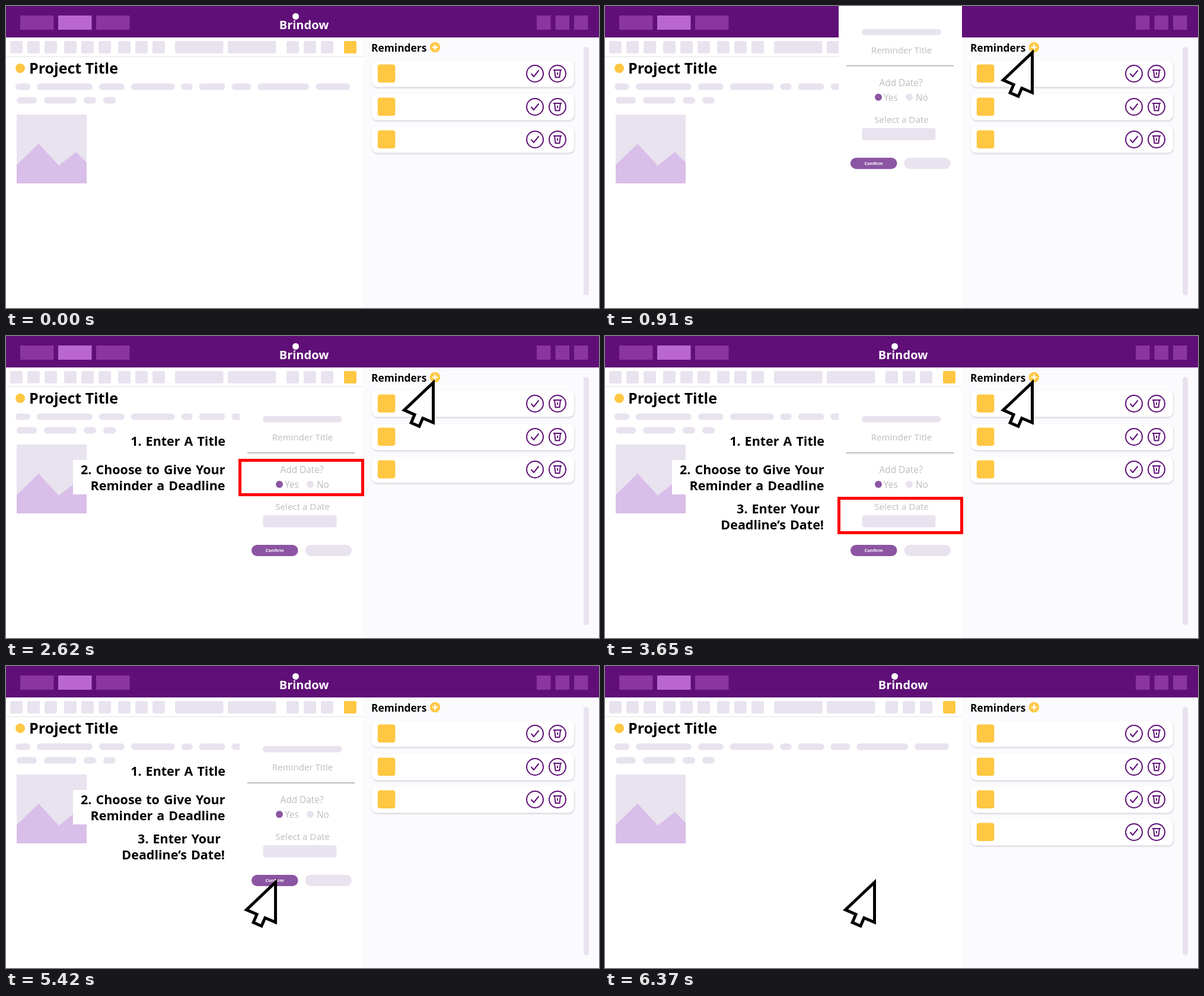
Animation of 1000 by 509 pixels, one loop 7500 ms. Source, as an HTML page with a canvas:

```html
<!DOCTYPE html>
<html lang="en">
<head>
<meta charset="utf-8">
<title>Adding a reminder</title>
<style>
html, body { margin: 0; width: 100%; height: 100%; overflow: hidden; background: #fff; }
canvas { display: block; width: 1000px; height: 509px; }
</style>
</head>
<body>
<canvas id="stage" width="1000" height="509"></canvas>
<script>
const ctx = document.getElementById('stage').getContext('2d');
const LOOP = 7500, TICK = 30;
const FONT = '"Open Sans", "Noto Sans", sans-serif';
const PURPLE = '#5f0f77', MID = '#8a35a2', BUTTON = '#8c55a3';
const PALE = '#e9e2ef', YELLOW = '#ffc742', GREY = '#bdbdbd';

const STEPS = [
  { at: 1490, top: 146, height: 67, baseline: 185, right: 370, lines: ['1. Enter A Title'] },
  { at: 2620, top: 207, height: 63, baseline: 233, right: 369.5,
    lines: ['2. Choose to Give Your', 'Reminder a Deadline'] },
  { at: 3650, top: 271, height: 63, baseline: 299, right: 369,
    lines: ['3. Enter Your ', 'Deadline’s Date!'] }
];
const STEPS_END = 4820;

// Linear progress in whole ticks, from 0 to 1
function progress(t, start, ticks) {
  const n = Math.floor((t - start) / TICK + 1e-6);
  return Math.max(0, Math.min(ticks, n)) / ticks;
}

function repeat(count, draw) {
  for (let i = 0; i < count; i++) draw(i);
}

function at(x, y, draw) {
  ctx.save();
  ctx.translate(x, y);
  draw();
  ctx.restore();
}

function faded(alpha, draw) {
  ctx.globalAlpha = alpha;
  draw();
  ctx.globalAlpha = 1;
}

function rect(x, y, w, h, color) {
  ctx.fillStyle = color;
  ctx.fillRect(x, y, w, h);
}

function round(x, y, w, h, r, color) {
  ctx.fillStyle = color;
  ctx.beginPath();
  ctx.roundRect(x, y, w, h, r);
  ctx.fill();
}

function circle(x, y, r) {
  ctx.beginPath();
  ctx.arc(x, y, r, 0, Math.PI * 2);
}

function disc(x, y, r, color) {
  circle(x, y, r);
  ctx.fillStyle = color;
  ctx.fill();
}

function path(points) {
  ctx.beginPath();
  points.forEach(([x, y]) => ctx.lineTo(x, y));
}

function stroke(color, width) {
  ctx.strokeStyle = color;
  ctx.lineWidth = width;
  ctx.stroke();
}

function text(str, x, y, size, weight, color, align = 'left') {
  ctx.font = `${weight} ${size}px ${FONT}`;
  ctx.fillStyle = color;
  ctx.textAlign = align;
  ctx.fillText(str, x, y);
}

function header() {
  rect(0, 0, 1000, 53, PURPLE);
  repeat(3, i => {
    rect(24 + 64 * i, 16, 56.5, 24, i === 1 ? '#b966d3' : MID);
    rect(895 + 31.5 * i, 16, 23.5, 24, MID);
  });
  disc(488.5, 17.5, 5.5, '#fff');
  text('Brindow', 502.5, 39, 20, 700, '#fff', 'center');
}

function toolbar() {
  const buttons = left => repeat(3, i => round(left + 29 * i, 59, 21, 21, 3, PALE));
  repeat(3, i => buttons(7 + 91 * i));
  buttons(473);
  repeat(2, i => round(285 + 89 * i, 59, 81.5, 21, 3, PALE));
  round(570, 59, 21, 21, 2, YELLOW);
  rect(0, 85, 602, 1, '#e4e2e6');
}

// A line of placeholder words with even gaps
function words(x, y, gap, widths) {
  for (const w of widths) {
    round(x, y, w, 11, 5.5, PALE);
    x += w + gap;
  }
}

function project() {
  disc(24, 105, 8, YELLOW);
  text('Project Title', 39, 114, 25, 700, '#000');
  words(16, 130.5, 10.9, [25, 94, 43, 74, 19, 44, 33, 87, 58]);
  words(18, 153.5, 12, [34, 55, 21, 21]);
  at(18, 183, () => {
    rect(0, 0, 118, 116, PALE);
    path([[0, 85], [37, 49], [71, 86], [100, 63], [118, 81], [118, 116], [0, 116]]);
    ctx.fillStyle = '#d9bee9';
    ctx.fill();
  });
}

function tick() {
  path([[-6.5, 0], [-2, 5], [6.5, -5.5]]);
  stroke(PURPLE, 2);
}

function bin() {
  path([[-7, -6], [7, -6]]);
  stroke(PURPLE, 2);
  path([[-5, -6], [-3.4, 6.3], [3.4, 6.3], [5, -6]]);
  stroke(PURPLE, 2);
  rect(-1, -2, 2, 4, PURPLE);
}

function card(i) {
  at(617, 92 + Math.ceil(55.3 * i), () => {
    ctx.shadowColor = 'rgba(40, 20, 60, 0.2)';
    ctx.shadowBlur = 3;
    ctx.shadowOffsetX = 0.5;
    ctx.shadowOffsetY = 1.5;
    round(0, 0, 341, 44.5, 9, '#fff');
    ctx.shadowColor = 'transparent';
    round(9.8, 6.6, 29.6, 30.3, 4, YELLOW);
    [tick, bin].forEach((icon, k) => at(275 + 38 * k, 22, () => {
      circle(0, 0, 14);
      stroke(PURPLE, 2);
      icon();
    }));
  });
}

function sidebar(newCard) {
  rect(602, 53, 398, 456, '#fbfafd');
  text('Reminders', 616, 77, 17.4, 700, '#000');
  disc(723.5, 69.5, 8.7, YELLOW);
  rect(718.5, 68.4, 10, 2.2, '#fff');
  rect(722.4, 64.5, 2.2, 10, '#fff');
  repeat(3, card);
  faded(newCard, () => card(3));
  round(974, 69, 9, 418.5, 4.5, PALE);
}

function panel() {
  rect(394, 90, 208, 298, '#fff');
  round(433, 135, 133.5, 10.5, 5, PALE);
  text('Reminder Title', 500, 176, 15.1, 400, GREY, 'center');
  rect(407, 196, 181, 2, GREY);
  text('Add Date?', 499, 231, 15.4, 400, GREY, 'center');
  ['Yes', 'No'].forEach((label, i) => {
    disc(461 + 52 * i, 250, 6, i ? PALE : BUTTON);
    text(label, 470 + 54 * i, 256, 15.4, 400, GREY);
  });
  text('Select a Date', 500, 293, 15.2, 400, GREY, 'center');
  round(433.5, 302, 124, 20.5, 4, PALE);
  repeat(2, i => round(414 + 90.5 * i, 352, 78.5, 19, 9.5, i ? PALE : BUTTON));
  text('Confirm', 453, 364, 7.7, 700, '#fff', 'center');
}

function captions(shown) {
  ctx.wordSpacing = '1.4px';
  shown.forEach((step, i) => {
    if (i === 1) rect(113, 209, 270, 58, '#fff');
    step.lines.forEach((line, k) =>
      text(line, step.right, step.baseline + 27 * k, 21.5, 700, '#000', 'right'));
  });
  ctx.wordSpacing = '0px';
}

function highlight({ top, height }) {
  ctx.strokeStyle = '#f00';
  ctx.lineWidth = 5;
  ctx.strokeRect(394.5, top + 2.5, 207, height - 5);
}

// Symmetric arrow, leaning so that its right edge is vertical
function cursor() {
  const side = [[26.7, 62], [7.5, 62], [7.5, 77]];
  const mirror = side.map(([x, y]) => [-x, y]).reverse();
  ctx.rotate(Math.atan2(26.7, 62));
  path([[0, 0], ...side, ...mirror]);
  ctx.closePath();
  ctx.fillStyle = '#fff';
  ctx.fill();
  stroke('#000', 5);
}

function render(t) {
  const enter = progress(t, 0, 11);
  const open = progress(t, 430, 21);
  const move = progress(t, STEPS_END, 20);
  const close = progress(t, 5890, 16);
  const shown = STEPS.filter(step => t >= step.at);

  rect(0, 0, 1000, 509, '#fff');
  header();
  toolbar();
  project();
  sidebar(close);
  at(0, -404.7 * (1 - open + close), panel);
  faded(1 - close, () => captions(shown));
  if (shown.length && t < STEPS_END) highlight(shown[shown.length - 1]);
  if (enter > 0) {
    at(720.5 + 332 * (1 - enter) - 266 * move, 78.5 + 134 * (1 - enter) + 286 * move, cursor);
  }
}

const began = performance.now();
function frame() {
  render((performance.now() - began) % LOOP);
  requestAnimationFrame(frame);
}
frame();
</script>
</body>
</html>
```
